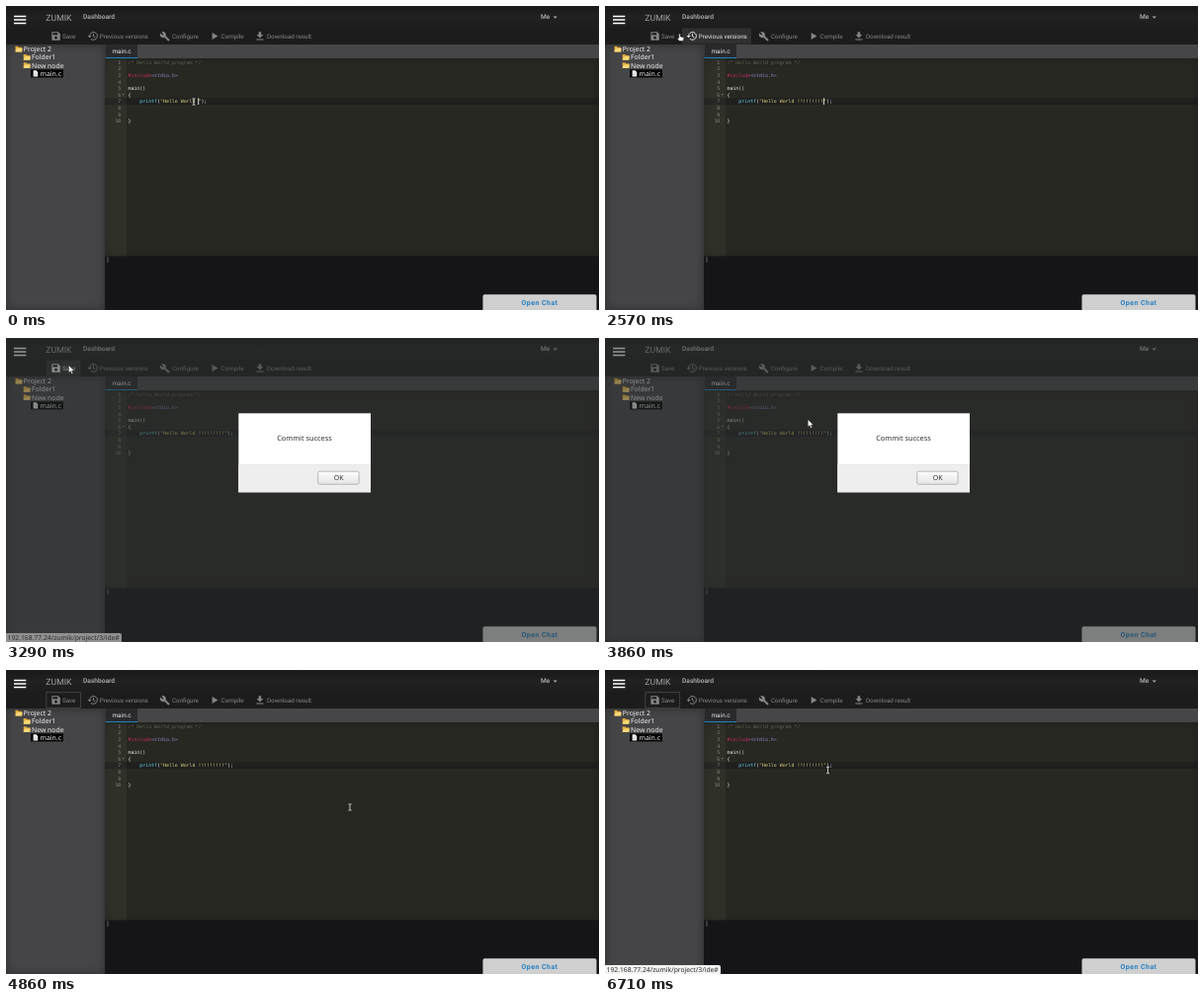
These frames come from a looping animation (600x308 px, 8 s). An HTML page:

```html
<!DOCTYPE html>
<html lang="en">
<head>
<meta charset="utf-8">
<title>Web IDE</title>
<style>
  html, body { margin: 0; width: 100%; height: 100%; overflow: hidden; background: #1b1b1b; }
  svg { display: block; width: 600px; height: 308px; }
  text { white-space: pre; text-rendering: geometricPrecision; }
  .ui { font-family: Roboto, sans-serif; }
  .sys { font-family: "Noto Sans", "Open Sans", sans-serif; }
  .code { font: 4.92px "DejaVu Sans Mono", monospace; fill: #f0f0ea; }
  .num { fill: #85867f; text-anchor: end; }
  .item { font-size: 6.25px; fill: #858585; color: #858585; }
  .item.hover { fill: #e6e6e6; color: #e6e6e6; }
  .item rect.back { fill: #303031; opacity: 0; }
  .item.hover rect.back { opacity: 1; }
  .tree { font-size: 6.85px; fill: #f2f2f2; }
</style>
</head>
<body>
<svg viewBox="0 0 600 308" xmlns="http://www.w3.org/2000/svg">
  <defs>
    <linearGradient id="btn" x2="0" y2="1">
      <stop stop-color="#fdfdfd"/><stop offset="1" stop-color="#e6e5e4"/>
    </linearGradient>
    <linearGradient id="head" x2="0" y2="1">
      <stop stop-color="#191919"/><stop offset=".5" stop-color="#212121"/><stop offset="1" stop-color="#1d1d1d"/>
    </linearGradient>
    <filter id="soft" x="-10%" y="-10%" width="120%" height="120%"><feGaussianBlur stdDeviation="4"/></filter>
    <clipPath id="sideClip"><rect y="39" width="100" height="269"/></clipPath>
    <clipPath id="codeClip"><rect x="100" y="53" width="500" height="200.5"/></clipPath>
    <g id="folder">
      <path d="M0 .8h2.6l.8.9h3.4v4.8H0z" fill="#e0a93a"/>
      <path d="M0 6.5 1 3h6.2l-.8 3.5z" fill="#f8d878"/>
    </g>
  </defs>

  <!-- header and toolbar -->
  <rect width="600" height="22" fill="url(#head)"/>
  <rect y="22" width="600" height="17" fill="#1c1c1c"/>
  <path d="M8 10.5h12.3M8 14h12.3M8 17.5h12.3" stroke="#fff" stroke-width="1.6"/>
  <g class="ui">
    <text x="40.3" y="14.5" font-size="8.7" fill="#a2a2a2">ZUMIK</text>
    <text x="78" y="13.4" font-size="6.6" font-weight="500" fill="#b4b4b4">Dashboard</text>
    <text x="541" y="13.4" font-size="6.6" font-weight="500" fill="#b4b4b4">Me</text>
    <path d="M553.6 10.4h4.2l-2.1 2.3z" fill="#a8a8a8"/>
    <g class="item" id="save">
      <rect class="back" x="41" y="22.5" width="34.5" height="16"/>
      <path d="M46.4 26.2h6.4l2 2v6.6h-8.4z" fill="currentColor"/>
      <path d="M47.4 27.2h4.8v2.2h-4.8z" fill="#1c1c1c"/>
      <circle cx="50.5" cy="32.2" r="1.4" fill="#1c1c1c"/>
      <text x="57" y="32.9">Save</text>
    </g>
    <g class="item" id="versions">
      <rect class="back" x="78" y="22.5" width="70" height="16"/>
      <path d="M84.6 30.4a3.9 3.9 0 1 1 1.3 2.9M88.4 28v2.7l2 1.2" fill="none" stroke="currentColor"/>
      <path d="M82.6 30h4l-2 2.2z" fill="currentColor"/>
      <text x="94.8" y="32.9">Previous versions</text>
    </g>
    <g class="item">
      <path d="M160.2 30.2 165 35" stroke="currentColor" stroke-width="2"/>
      <path d="M157.2 26.4 159.2 28.4 158.2 29.4 156.2 27.4a3.1 3.1 0 1 0 1-1z" fill="currentColor"/>
      <text x="168" y="32.9">Configure</text>
    </g>
    <g class="item">
      <path d="M208.6 27 214.4 30.4 208.6 33.9z" fill="currentColor"/>
      <text x="217.6" y="32.9">Compile</text>
    </g>
    <g class="item">
      <path d="M255.6 26.3h2.6v2.8h2l-3.3 3.3-3.3-3.3h2zM253.3 33.4h7.2v1.2h-7.2z" fill="currentColor"/>
      <text x="264" y="32.9">Download result</text>
    </g>
    <rect id="focus" x="40.8" y="22.6" width="34.8" height="15.8" fill="none" stroke="#6f6f6f" stroke-width=".7" stroke-dasharray="1 .5"/>
  </g>

  <!-- project tree -->
  <rect y="39" width="100" height="269" fill="#454548"/>
  <g clip-path="url(#sideClip)">
    <rect x="-3" y="36" width="106" height="275" fill="none" stroke="#000" stroke-width="8" opacity=".3" filter="url(#soft)"/>
  </g>
  <g class="sys tree">
    <use href="#folder" x="9.5" y="40"/><text x="17.8" y="46.2">Project 2</text>
    <use href="#folder" x="17.7" y="48.3"/><text x="26" y="54.4">Folder1</text>
    <use href="#folder" x="17.7" y="56.5"/><text x="26" y="62.6">New node</text>
    <rect x="25" y="64.4" width="33" height="8" fill="#000"/>
    <path d="M27.6 65.3h3l1.6 1.6v4.7h-4.6z" fill="#f4f4f4"/>
    <path d="M28.4 68h2.8M28.4 69.6h2.8" stroke="#aaa" stroke-width=".5"/>
    <text x="34.6" y="70.8">main.c</text>
  </g>

  <!-- editor -->
  <rect x="100" y="39" width="500" height="14.2" fill="#464649"/>
  <rect x="100.5" y="39" width="32.5" height="14" fill="#29292b"/>
  <rect x="100.5" y="52" width="32.5" height="1.2" fill="#1d84c4"/>
  <text class="ui" x="107.5" y="48.4" font-size="6.4" fill="#e8e8e8">main.c</text>
  <rect x="100" y="53.2" width="500" height="200.3" fill="#272822"/>
  <rect x="100" y="53.2" width="22" height="200.3" fill="#2f3129"/>
  <rect x="100" y="93.3" width="22" height="6.7" fill="#272727"/>
  <rect x="122" y="93.3" width="478" height="6.7" fill="#1f1f1f"/>
  <g clip-path="url(#codeClip)">
    <rect x="98" y="51" width="504" height="205" fill="none" stroke="#000" stroke-width="5" opacity=".22" filter="url(#soft)"/>
  </g>
  <g id="lines" class="code"></g>
  <rect id="caret" y="93.3" width=".9" height="6.6" fill="#f8f8f0"/>

  <!-- console, chat, link hint -->
  <rect x="100" y="253.5" width="500" height="54.5" fill="#151418"/>
  <rect x="102.6" y="254.3" width=".8" height="5.6" fill="#77777a"/>
  <path d="M482.5 308v-14q0-1.8 1.8-1.8h111.4q1.8 0 1.8 1.8v14z" fill="#cfcfcf"/>
  <text class="ui" x="540" y="302.8" font-size="7" font-weight="700" letter-spacing=".45" text-anchor="middle" fill="#2382c4">Open Chat</text>
  <g id="hint">
    <path d="M0 299h115q2 0 2 2v7H0z" fill="#f3f3f2"/>
    <text class="sys" x="1.6" y="306.1" font-size="6.75" fill="#2a2a2a">192.168.77.24/zumik/project/3/ide#</text>
  </g>

  <!-- message box -->
  <g id="dialog" class="sys" fill="#2e3436" text-anchor="middle">
    <rect width="600" height="308" fill="#2c2f2f" opacity=".5"/>
    <rect x="235.3" y="76.3" width="133.7" height="80" fill="#fff"/>
    <rect x="235.3" y="128.3" width="133.7" height="28" fill="#efeeee"/>
    <path d="M235.3 128.3h133.7" stroke="#dcdcdc" stroke-width=".6"/>
    <text x="302" y="104" font-size="7.35">Commit success</text>
    <rect x="315.7" y="135.2" width="41.4" height="13" rx="1.6" fill="url(#btn)" stroke="#a9a7a4" stroke-width=".8"/>
    <text x="336.6" y="144.2" font-size="7">OK</text>
  </g>

  <g stroke="#222" stroke-width=".7">
    <path id="arrow" fill="#fff" d="M0 0V8.2L1.9 6.5 3.2 9.3 4.6 8.6 3.4 6H5.9z"/>
    <path id="hand" fill="#fff" d="M-.8 4.6V.6q.8-1 1.6 0V3l2.8.6q.9.3.8 1.2L3.8 7.6H-.4L-2.4 5q.5-1 1.6-.4z"/>
  </g>
  <path id="beam" d="M-1.5-3.3Q0-3.3 0-2.5Q0-3.3 1.5-3.3M0-2.6V2.6M-1.5 3.3Q0 3.3 0 2.5Q0 3.3 1.5 3.3" fill="none" stroke="#f0f0f0" stroke-width=".8"/>
</svg>
<script>
const LOOP = 8000, TICK = 1000 / 7;
const CHAR = 4.92 * 0.602, LEFT = 123.5, TOP = 58.7, LINE = 6.62;
const $ = id => document.getElementById(id);

// Source lines as [text, colour, id] runs
const WHITE = '#f0f0ea', YELLOW = '#dfd474';
const source = [
  [['/* Hello World program */', '#626052']],
  [],
  [['#include', '#c8285f'], ['<stdio.h>', '#8d83c6']],
  [],
  [['main()', WHITE]],
  [['{', WHITE]],
  [['    ', WHITE], ['printf', '#66d0e6'], ['(', WHITE], ['"Hello World ', YELLOW], ['', YELLOW, 'marks'], ['"', YELLOW], [');', WHITE]],
  [],
  [],
  [['}', WHITE]]
];
const run = ([text, color, id]) =>
  `<tspan ${id ? `id="${id}"` : ''} fill="${color}">${text.replace('<', '&lt;').replace('>', '&gt;')}</tspan>`;
$('lines').innerHTML = source.map((runs, i) => {
  const y = TOP + i * LINE;
  return `<text class="num" x="116.3" y="${y}">${i + 1}</text>` +
    `<text x="${LEFT}" y="${y}">${runs.map(run).join('')}</text>`;
}).join('') + '<path d="M117.6 89h2.2l-1.1 1.5z" fill="#85867f"/>';

// Pointer stops: tick, x, y
const path = [
  [0, 190, 97], [15, 190, 97], [16, 155, 76], [17, 108, 47], [18, 75.5, 28],
  [19, 68, 27.5], [20, 64, 27.5], [23, 63.3, 27.3], [31, 347, 137], [32, 347.3, 137.6],
  [33, 347.3, 137.6], [34, 348, 139], [37, 348, 139], [38, 296, 117], [39, 249, 101],
  [40, 249, 101], [41, 226, 94], [42, 203, 87], [43, 192, 86], [44, 196, 92],
  [45, 208, 98], [46, 219, 101], [47, 225.5, 101.5], [56, 225.5, 101.5]
];
const ease = p => p * p * (3 - 2 * p);

function pointer(tick) {
  const i = path.findIndex((p, k) => k && tick < p[0]);
  const [t0, x0, y0] = path[i - 1], [t1, x1, y1] = path[i];
  const p = ease((tick - t0) / (t1 - t0));
  return [x0 + (x1 - x0) * p, y0 + (y1 - y0) * p];
}

const show = (id, on) => $(id).setAttribute('visibility', on ? 'visible' : 'hidden');
const within = (n, from, to) => n >= from && n < to;

function draw(time) {
  const tick = Math.min(55, Math.floor((time + 5) / TICK));

  const typed = Math.min(9, tick < 7 ? tick : tick - 1);
  $('marks').textContent = '!'.repeat(typed);
  $('caret').setAttribute('x', LEFT + (24 + typed) * CHAR - 0.3);
  show('caret', tick < 14 || within(tick, 17, 21));

  $('versions').classList.toggle('hover', tick === 18);
  $('save').classList.toggle('hover', within(tick, 19, 24));
  show('focus', tick >= 34);
  show('hint', within(tick, 19, 24) || tick >= 35);
  show('dialog', within(tick, 23, 34));

  const kind = within(tick, 18, 23) ? 'hand' : within(tick, 23, 34) ? 'arrow' : 'beam';
  for (const id of ['hand', 'arrow', 'beam']) show(id, id === kind);
  $(kind).setAttribute('transform', `translate(${pointer(tick)})`);
}

function frame() {
  draw(performance.now() % LOOP);
  requestAnimationFrame(frame);
}
frame();
</script>
</body>
</html>
```
